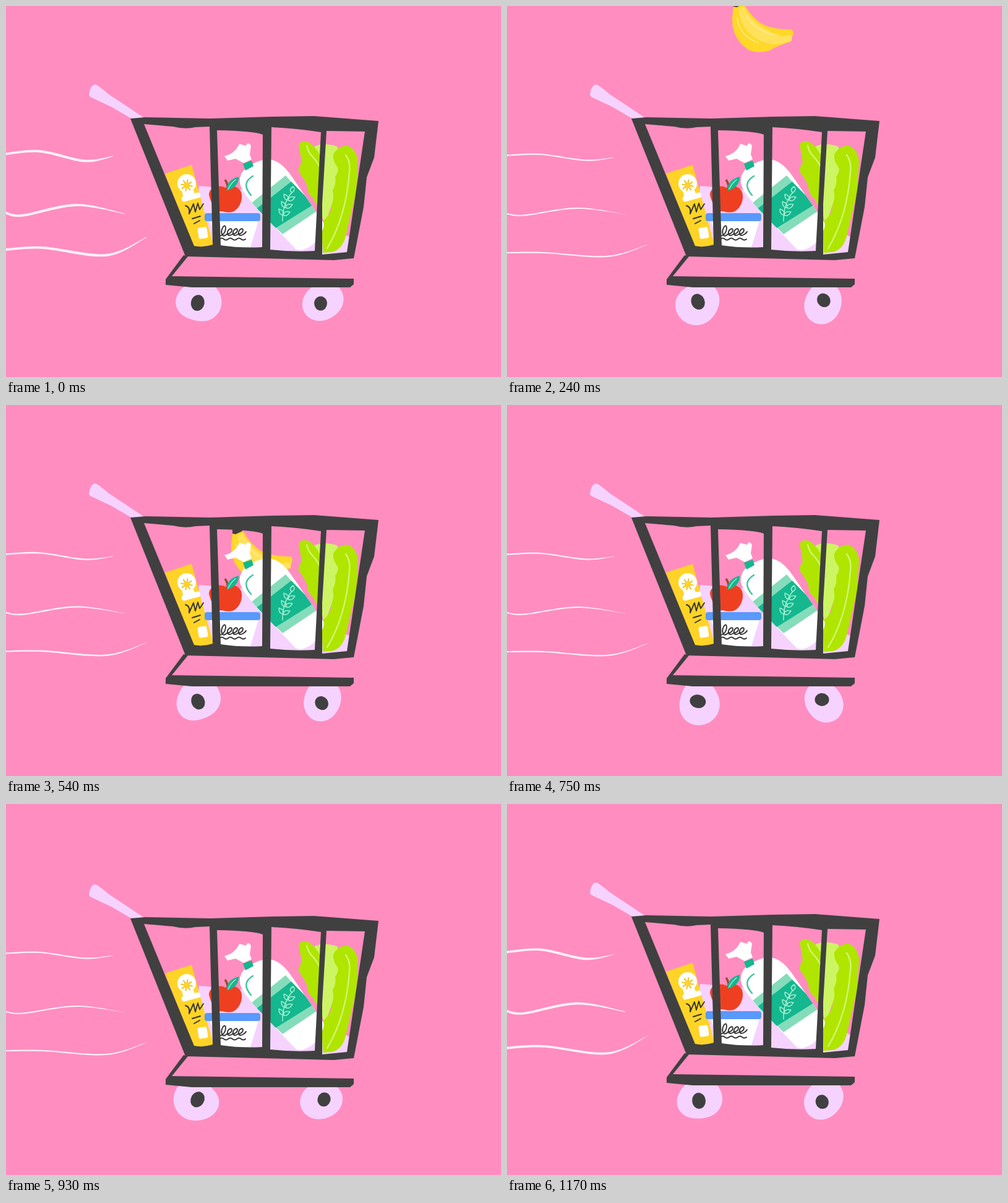
Animation, 800 px wide and 600 px high, one loop 1.2 s. Source, as an HTML page:

```html
<!DOCTYPE html>
<html lang="en">
<head>
<meta charset="utf-8">
<title>Shopping cart</title>
<style>
  html, body { margin: 0; width: 100%; height: 100%; overflow: hidden; background: #ff8dc0; }
  svg { display: block; width: 100vw; height: 100vh; }
  .dark { fill: #404040; }
  .lilac { fill: #f6d2ff; }
  .white { fill: #fff; }
  .teal { fill: #14b78e; }
  .mint { fill: #84dcba; }
  .lime { fill: #b0e500; }
  .pale { fill: #cdf463; }
  .yellow { fill: #ffd426; }
  .pen { fill: none; stroke: #333; stroke-width: 1.9; stroke-linecap: round; stroke-linejoin: round; }
  .pen.vein { stroke: #d3f77a; stroke-width: 2.2; }
  .pen.sprig { stroke: #a5eed2; stroke-width: 1.5; }
  .pen.shine { stroke: #3cc5a0; stroke-width: 2.4; }
  .pen.peel { stroke: #ffee9b; stroke-width: 1.4; }
</style>
</head>
<body>
<svg viewBox="0 0 800 600" preserveAspectRatio="none">
  <defs>
    <clipPath id="aboveFloor"><rect width="800" height="400"/></clipPath>
    <clipPath id="bagShape"><path id="bag" d="M388 262Q376 272 378 287Q381 302 413 335L468 393Q479 399 497 385Q517 360 513 350L462 276Q444 249 424 248Q408 248 388 262Z"/></clipPath>
  </defs>

  <g id="lines" fill="#fff1f9"></g>
  <g id="wheels"></g>

  <g clip-path="url(#aboveFloor)">
    <g id="banana">
      <path fill="#ffd829" d="M366 80L383 76Q396 98 412 108Q430 117 460 117Q465 122 461 128L460 136Q440 142 424 151Q408 156 392 151Q362 132 364 97Z"/>
      <path fill="#ffe15c" d="M374 84L383 80Q395 110 443 128L460 126V135L443 140Q424 143 404 133Q378 117 374 84Z"/>
      <path class="pen peel" d="M372 98Q376 128 406 138M387 96Q402 118 432 126"/>
      <path class="dark" d="M366 72Q370 66 381 67L382 76L371 81L366 80Z"/>
    </g>
  </g>

  <g id="cart">
    <path class="lilac" d="M134 144Q136 128 144 127Q149 128 165 142L222 180L206 184L170 163L136 147Z"/>
    <path class="lilac" d="M312 291L386 297L500 345L556 374V403H300Z"/>

    <!-- lettuce -->
    <path class="pale" d="M496 229Q510 219 535 227L545 250L534 300L515 354L508 330Z"/>
    <path class="lime" d="M473 224Q480 214 492 222Q511 238 513 262L510 330Q498 318 497 311Q487 305 487 292Q483 281 473 268Q472 262 478 252Z"/>
    <path class="lime" d="M529 240Q538 225 552 226Q566 231 569 250L566 300L550 368Q545 394 526 398L512 399L510 350Q527 336 526 322Q531 312 528 298Q534 288 532 276Q540 266 534 258Q528 250 529 240Z"/>
    <path class="pen vein" d="M549 241Q557 252 555 268Q550 340 519 392M486 226Q488 236 495 243T508 262"/>

    <!-- bread bag -->
    <use href="#bag" class="white"/>
    <g clip-path="url(#bagShape)">
      <path class="mint" d="M396 319L452 274L502 332L447 369Z"/>
      <path class="teal" d="M402 330L461 284L497 321L436 359Z"/>
    </g>
    <path class="pen shine" d="M399 275Q379 287 396 306"/>
    <path class="white" d="M353 243Q371 238 377 223L388 226Q391 218 396 226L394 240L397 248L384 254L371 247L358 250Z"/>
    <path class="teal" d="M383 255L397 250L400 259L387 266Z"/>
    <g id="sprig" class="pen sprig"><path d="M447 348Q446 322 462 301"/></g>

    <!-- carton -->
    <path class="yellow" d="M257 271L300 257L334 382V388L303 390Z"/>
    <circle class="white" cx="292" cy="287" r="15"/>
    <path class="white" d="M284 298H303L306 306L287 311Z"/>
    <rect class="white" x="-15.5" y="-4.5" width="31" height="9" rx="4" transform="translate(299 309)rotate(-15)"/>
    <circle class="yellow" cx="292" cy="290" r="5"/>
    <g id="rays" stroke="#f0c020" stroke-width="2" stroke-linecap="round"></g>
    <path class="pen" d="M290 323Q298 325 296 336L303 320L306 333L310 319L313 329L319 320M301 344L314 340M304 352L313 347"/>
    <rect class="white" x="-7.5" y="-9" width="15" height="18" rx="3" transform="translate(318 367)rotate(-9)"/>

    <!-- tub -->
    <path class="white" d="M329 346L408 348L395 390H344Z"/>
    <rect x="321" y="335" width="90" height="13" rx="4" fill="#5899fb"/>
    <path id="script" class="pen"/>
    <path class="pen" d="M345 377q3.500-3 7 0t7 0t7 0t7 0t7 0t7 0"/>

    <!-- apple -->
    <path fill="#ee4020" d="M355 294C362 289 376 291 380 301C384 313 377 329 366 333Q358 335 349 332C339 334 330 316 328 305C328 293 345 288 355 294Z"/>
    <path d="M358 296Q359 288 354 281" fill="none" stroke="#9a4a2b" stroke-width="3.600"/>
    <path class="teal" d="M357 299Q355 282 376 276Q377 292 357 299Z"/>
    <path class="pen sprig" d="M359 296Q364 286 371 281"/>

    <!-- basket and base -->
    <path class="dark" fill-rule="evenodd" d="M201 182L225 180L330 182L430 179L498 178L602 186L595 245L583 277L578 325L562 408L530 411L290 405Z
      M223 191L270 195Q290 200 306 196L329 195L334 386Q318 391 304 388Z
      M341 201Q400 202 415 208L414 390Q380 392 347 387Z
      M429 196Q470 198 509 204L499 396Q464 398 427 394Z
      M518 202L580 203L551 398L511 402V320Z"/>
    <path class="dark" fill-rule="evenodd" d="M287 403L258 442V451L300 455H556L562 450V441L268 437L294 405Z"/>
  </g>
</svg>
<script>
const LOOP = 1200, STEP = 30, TURN = 600;
const $ = s => document.querySelector(s);
const move = (el, x, y, deg = 0) => el.setAttribute('transform', `translate(${x} ${y})rotate(${deg})`);
const cos = deg => Math.cos(deg * Math.PI / 180);
const sin = deg => Math.sin(deg * Math.PI / 180);
const clamp = v => Math.min(1, Math.max(0, v));
const repeat = (n, fn) => Array.from({ length: n }, (_, i) => fn(i)).join('');

// Uneven wheels: a circle with a few gentle waves
function wheel(radius, hub) {
  const pts = repeat(72, i => `${radius(i * 5) * cos(i * 5)},${radius(i * 5) * sin(i * 5)} `);
  return `<g><polygon class="lilac" points="${pts}"/>${hub}</g>`;
}
$('#wheels').innerHTML =
  wheel(a => 34.6 + 2.9 * cos(a + 30) + 2.5 * cos(2 * a) + .8 * cos(3 * a - 150),
    '<ellipse class="dark" cx=".5" cy="1" rx="10.8" ry="13" transform="rotate(12)"/>') +
  wheel(a => 32 + 1.5 * cos(a + 45) + 2.7 * cos(2 * a + 68),
    '<ellipse class="dark" cx="-2.5" cy="2" rx="10.4" ry="11.5"/>');

$('#rays').innerHTML = repeat(8, i =>
  `<path d="M5 0H9" transform="translate(292 290)rotate(${i * 45 + 10})"/>`);

$('#sprig').innerHTML += repeat(6, i => {
  const row = i >> 1, turn = i % 2 ? -125 : -25;
  return `<path d="M0 0Q4-6 12 0Q4 6 0 0" transform="translate(${448 + row * 4} ${338 - row * 12})rotate(${turn})"/>`;
}) + '<path d="M462 302Q456 297 464 292Q469 297 462 302"/>';

$('#script').setAttribute('d', 'M345 372Q354 370 355 360Q355 353 351 357Q346 365 350 371Q353 373 357 369' +
  repeat(3, () => 'q8-1 8-7q-1-3-4-1q-4 3-3 8q2 4 8 0') + 'q3-2 4-4');

// Speed lines: points as [x, resting y, lift]
const lines = [
  [[0, 241.6, 2.5], [55, 240, 5], [127, 249.5, -1], [173, 245, 2]],
  [[0, 336, 1], [28, 338.5, 0], [113, 327, 5], [192, 337, 1]],
  [[0, 399, 5], [60, 399, 8], [162, 405, 2], [227, 386, 12]]
];
$('#lines').innerHTML = repeat(lines.length, () => '<path/>');

// Smooth curve through points, as path commands after the first point
function curve(p) {
  return p.slice(1).map((c, i) => {
    const a = p[i - 1] || p[i], b = p[i], e = p[i + 2] || c;
    return `C${b.map((v, k) => v + (c[k] - a[k]) / 6)} ${c.map((v, k) => v - (e[k] - b[k]) / 6)} ${c}`;
  }).join('');
}

function drawLines(t) {
  // A quick swell at the end of each turn that fades at the start of the next
  const swell = clamp(Math.max(1 - t / 150, (t - 535) / 40));
  const half = 1.1 + .8 * swell;
  lines.forEach((line, i) => {
    const edge = side => line.map(([x, y, lift], j) =>
      [x, y - lift * swell + side * half * (j < 3 ? 1 : .2)]);
    const top = edge(-1), low = edge(1).reverse();
    $('#lines').children[i].setAttribute('d', `M${top[0]}${curve(top)}L${low[0]}${curve(low)}Z`);
  });
}

function draw(t) {
  const turn = t % TURN, [back, front] = $('#wheels').children;
  drawLines(turn);
  move(back, 309.5, 479, turn / TURN * 360);
  move(front, 511, 479, turn / TURN * 360);

  const u = t - 360;
  move($('#banana'), 0, .679 * u + .000176 * u * u);

  // The cart dips once the fruit has landed
  move($('#cart'), 0, 3 * sin(180 * clamp((t - 780) / 300)));
}

function tick() {
  draw(Math.floor(performance.now() % LOOP / STEP) * STEP);
  requestAnimationFrame(tick);
}
tick();
</script>
</body>
</html>
```
